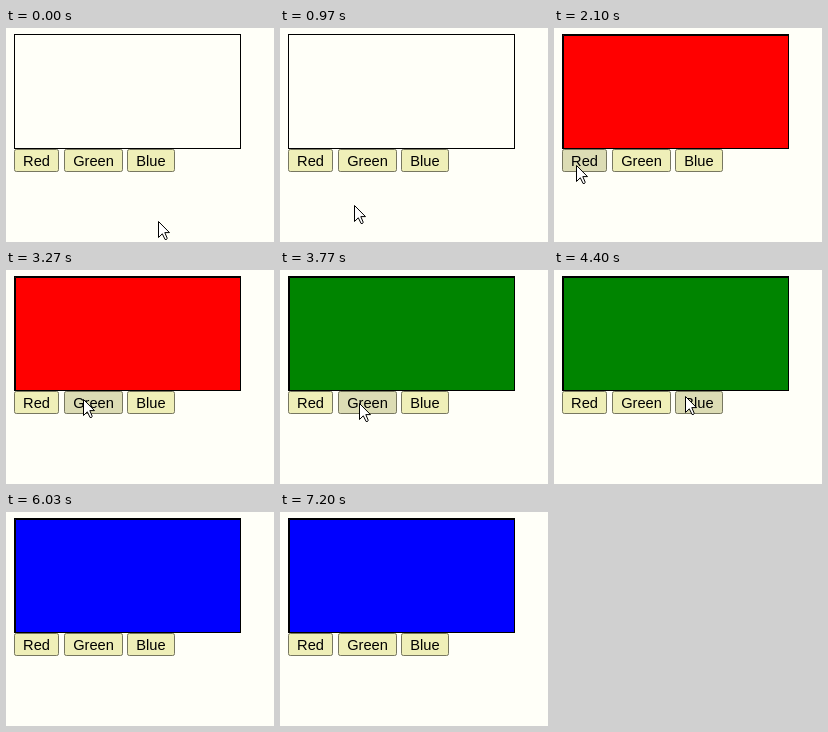
These frames come from a looping animation (268x214 px, 7.23 s). An HTML page:

```html
<!DOCTYPE html>
<html lang="en">
<head>
<meta charset="utf-8">
<title>Colour buttons</title>
<style>
  html, body { margin: 0; width: 100%; height: 100%; overflow: hidden; background: #fffff8; }
  svg { display: block; width: 100vw; height: 100vh; }
  text { font: 14.67px "Liberation Sans", Arial, sans-serif; fill: #000; text-anchor: middle; }
  .button rect { stroke: #777760; }
</style>
</head>
<body>
<svg viewBox="0 0 268 214">
  <rect id="panel" x="8.5" y="6.5" width="226" height="114" stroke="#000"/>
  <path id="edge" d="M9.5 120V7.5H234" fill="none" stroke="#000"/>
  <g id="buttons"></g>
  <path id="cursor" d="M.5 .5V16.5L4.3 12.8L7.1 18.5H8.5L9.2 17.2L6.8 11.6H11.5Z"
        fill="#fff" stroke="#000" stroke-linejoin="round"/>
</svg>
<script>
const LOOP = 7230;
const GLIDE = 280;       // length of each pointer move
const CLICK_DELAY = 400; // from reaching a button to pressing it
const TOP = 121, HEIGHT = 23;
const FACE = '#efefb8', HOVER = '#dcdcb4';

const buttons = [
  { label: 'Red', color: '#ff0000', x: 8, w: 45 },
  { label: 'Green', color: '#008400', x: 58, w: 59 },
  { label: 'Blue', color: '#0000ff', x: 121, w: 48 }
];
const [red, green, blue] = buttons;

const home = { x: 152, y: 193 };
const moves = [
  { at: 420, x: 74, y: 177 },
  { at: 1060, x: 22, y: 137, press: red },
  { at: 2980, x: 77, y: 129, press: green },
  { at: 3720, x: 100, y: 173 },
  { at: 4060, x: 131, y: 126, press: blue },
  { at: 4450, x: 142, y: 127 },
  { at: 5340, x: 229, y: 52 }
];
const exit = moves[moves.length - 1].at + GLIDE;

const byId = id => document.getElementById(id);
const panel = byId('panel'), edge = byId('edge'), cursor = byId('cursor');

function add(parent, tag, attrs) {
  const node = document.createElementNS('http://www.w3.org/2000/svg', tag);
  for (const key in attrs) node.setAttribute(key, attrs[key]);
  return parent.appendChild(node);
}

for (const b of buttons) {
  const g = add(byId('buttons'), 'g', { class: 'button' });
  b.face = add(g, 'rect', { x: b.x + .5, y: TOP + .5, width: b.w - 1, height: HEIGHT - 1, rx: 1.8 });
  add(g, 'text', { x: b.x + b.w / 2, y: 138 }).textContent = b.label;
}

const show = (node, on) => node.setAttribute('visibility', on ? 'visible' : 'hidden');

function ease(u) {
  u = Math.min(1, Math.max(0, u));
  return u * u * (3 - 2 * u);
}

function pointerAt(t) {
  let { x, y } = home;
  for (const move of moves) {
    const u = ease((t - move.at) / GLIDE);
    x += (move.x - x) * u;
    y += (move.y - y) * u;
  }
  return { x: Math.round(x), y: Math.round(y) };
}

function render(t) {
  const { x, y } = pointerAt(t);
  const visible = t < exit;
  cursor.setAttribute('transform', `translate(${x} ${y})`);
  show(cursor, visible);

  const pressed = moves.filter(m => m.press && t >= m.at + GLIDE + CLICK_DELAY).pop();
  panel.setAttribute('fill', pressed ? pressed.press.color : 'none');
  show(edge, pressed);

  for (const b of buttons) {
    const over = visible && x >= b.x && x < b.x + b.w && y >= TOP && y < TOP + HEIGHT;
    b.face.setAttribute('fill', over ? HOVER : FACE);
  }
}

const start = performance.now();
function tick() {
  render((performance.now() - start) % LOOP);
  requestAnimationFrame(tick);
}
tick();
</script>
</body>
</html>
```
